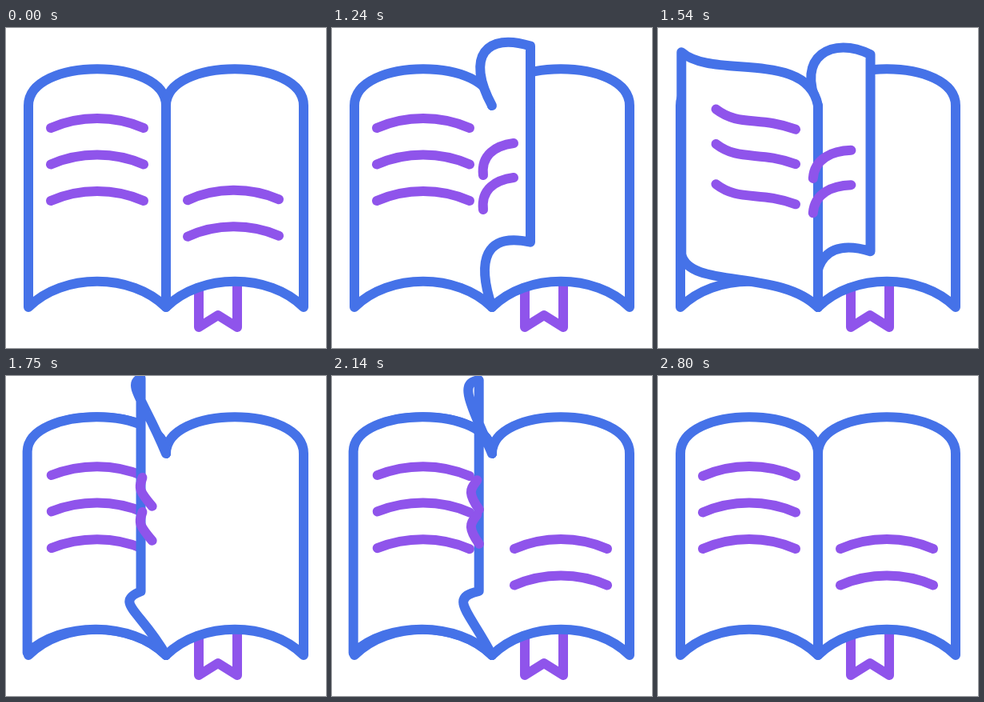
Recreate the animation shown at these times as an HTML page with a canvas. Size 400x400 px, loop 2.83 s.

```html
<!DOCTYPE html>
<html lang="en">
<head>
<meta charset="utf-8">
<title>Book</title>
<style>
  html, body { margin: 0; width: 100%; height: 100%; overflow: hidden; background: #fff; }
  canvas { display: block; width: 400px; height: 400px; }
</style>
</head>
<body>
<canvas id="stage"></canvas>
<script>
const LOOP = 2830, STARTS = [1000, 1386, 1790];
// Moments within one page turn, in ms.
const OPEN = 45, LIFT = 250, DROP = 528, LANDED = 556, TURN = 1000;
const SWAP = (LIFT + DROP) / 2;
const BLUE = '#4572e8', PURPLE = '#8f54eb';

const canvas = document.getElementById('stage');
const dpr = window.devicePixelRatio || 1;
canvas.width = canvas.height = 400 * dpr;
const g = canvas.getContext('2d');
g.scale(dpr, dpr);
g.lineCap = g.lineJoin = 'round';
g.lineWidth = 12;

// Each pose: top and foot curves running out from the spine,
// the first text line, and how far below it the next lines sit.
const LEFT = {
  top: [200, 36, 28, 36, 28, 97],
  foot: [157, 306, 71, 306, 28, 349],
  line: [172, 125, 136, 109, 92, 109, 56, 125],
  rows: [0, 45.5, 91]
};
const CURL = {
  top: [166, 35, 192, 5, 247, 22],
  foot: [180, 290, 190, 255, 247, 267],
  line: [189, 184, 186, 158, 205, 147, 227, 144],
  rows: [0, 43, 93]
};
const LIFTED = {
  top: [185, 25, 80, 69, 36, 20],
  foot: [150, 300, 40, 330, 36, 273],
  line: [172, 127, 125, 110, 103, 126, 75, 98],
  rows: [0, 43, 94]
};
const mirror = (pts, drop = 0) => pts.map((v, i) => i % 2 ? v + drop : 400 - v);
const RIGHT = {
  top: mirror(LEFT.top),
  foot: mirror(LEFT.foot),
  line: mirror(LEFT.line, 91),
  rows: LEFT.rows
};

const blend = (a, b, p) => a.map((v, i) => v + (b[i] - v) * p);
const mix = (a, b, p) =>
  Object.fromEntries(Object.keys(a).map(k => [k, blend(a[k], b[k], p)]));
const smooth = u => u * u * (3 - 2 * u);

// Quick start, long soft finish; halfway there after `half` ms.
function glide(ms, half, power) {
  const x = (Math.max(0, ms) / half) ** power;
  return x / (1 + x);
}

function poseAt(e) {
  if (e < LIFT) {
    const p = glide(e - 10, 80, 2) / 0.9;
    const pose = mix(RIGHT, CURL, p);
    pose.line = blend(RIGHT.line, CURL.line, Math.min(1, p + 0.025));
    return pose;
  }
  if (e < DROP) {
    const p = smooth((e - LIFT) / (DROP - LIFT));
    const pose = mix(CURL, LIFTED, p);
    const rise = 20 * Math.sin(Math.PI * p);
    pose.top[3] -= rise;
    pose.top[5] -= rise;
    return pose;
  }
  const p = glide(e - DROP, 37, 1.8);
  const pose = mix(LIFTED, LEFT, p);
  const swing = 14 * Math.sin(Math.PI * p);
  for (const curve of [pose.top, pose.foot]) {
    curve[2] -= swing;
    curve[4] -= swing;
  }
  return pose;
}

function stroke(path, color) {
  g.strokeStyle = color;
  g.stroke(path);
}

function drawLines({ line, rows }, count) {
  const path = new Path2D();
  for (const dy of rows.slice(0, count)) {
    const [x, y, ...rest] = line.map((v, i) => i % 2 ? v + dy : v);
    path.moveTo(x, y);
    path.bezierCurveTo(...rest);
  }
  stroke(path, PURPLE);
}

function outline({ top, foot }, closed) {
  const path = new Path2D();
  path.moveTo(200, 97);
  path.bezierCurveTo(...top);
  path.lineTo(foot[4], foot[5]);
  path.bezierCurveTo(foot[2], foot[3], foot[0], foot[1], 200, 349);
  if (closed) path.closePath();
  return path;
}

function drawPage(e, spine) {
  const pose = poseAt(e);
  const path = outline(pose, spine);
  g.fillStyle = '#fff';
  g.fill(path);
  stroke(path, BLUE);
  if (e >= SWAP) drawLines(pose, 3);
}

function draw(t) {
  g.fillStyle = '#fff';
  g.fillRect(0, 0, 400, 400);

  const turning = STARTS.map(s => t - s).filter(e => e >= 0 && e < TURN);
  const fronts = turning.filter(e => e < SWAP);
  const lifted = turning.filter(e => e >= SWAP && e < LANDED);
  const landed = turning.filter(e => e >= LANDED);
  const spine = !fronts.some(e => e > OPEN);  // a curled page covers the spine

  stroke(new Path2D('M241 325V374L265 359L289 374V319'), PURPLE);
  stroke(outline(LEFT, spine), BLUE);
  stroke(outline(RIGHT, spine), BLUE);
  drawLines(LEFT, 3);
  if (t < STARTS[0]) drawLines(poseAt(0), 2);
  if (t >= STARTS[2]) drawLines(RIGHT, 2);

  landed.forEach(e => drawPage(e, spine));
  fronts.forEach(e => drawPage(e, spine));
  lifted.forEach(e => drawPage(e, true));
  fronts.forEach(e => drawLines(poseAt(e), 2));
}

const begin = performance.now();
function tick() {
  draw((performance.now() - begin) % LOOP);
  requestAnimationFrame(tick);
}
tick();
</script>
</body>
</html>
```
